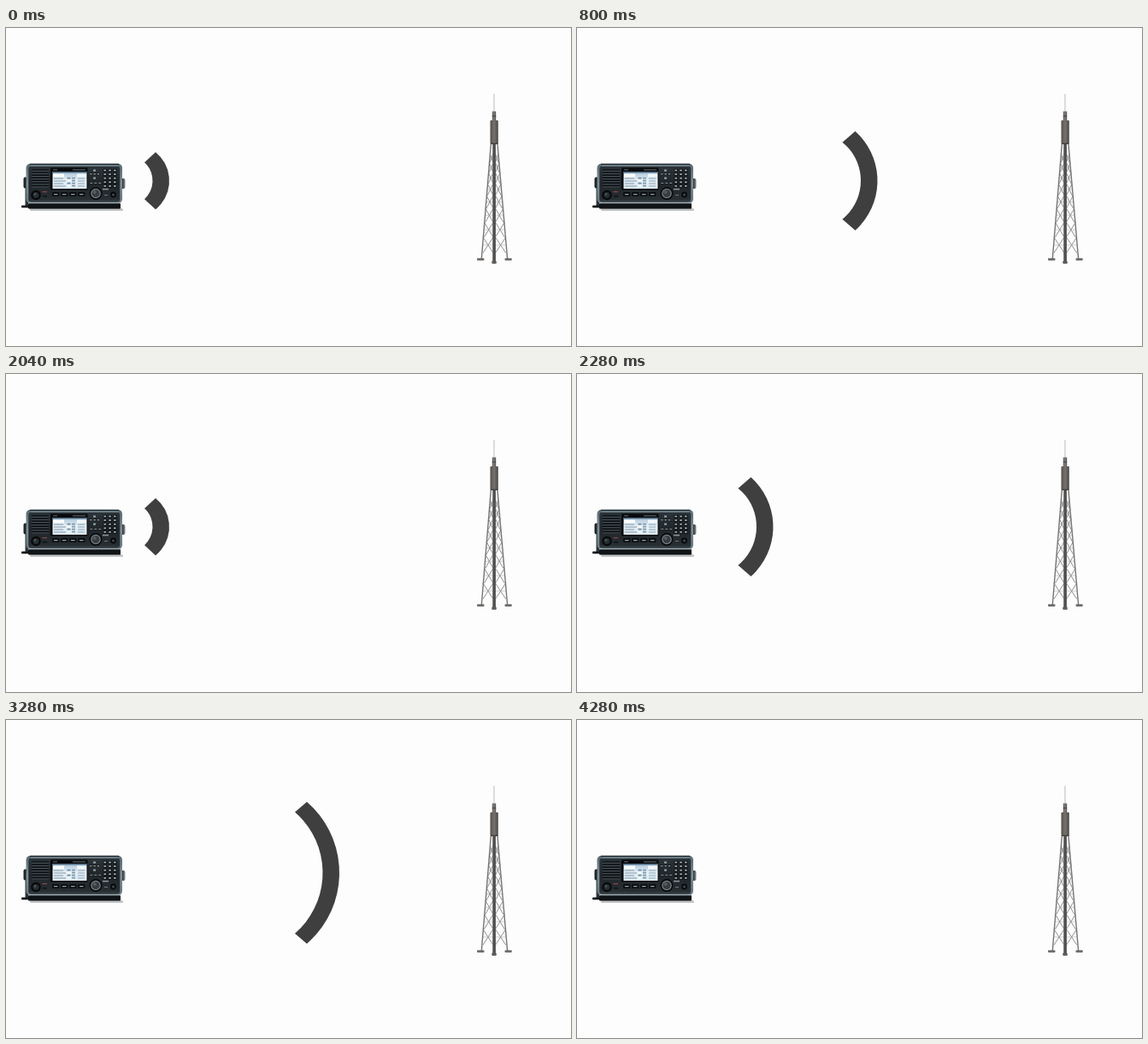
An HTML page with a canvas that plays this animation: 661 by 372 pixels, repeating every 4520 ms.

```html
<!DOCTYPE html>
<html lang="en">
<head>
<meta charset="utf-8">
<title>Radio to mast</title>
<style>
  html, body { margin: 0; width: 100%; height: 100%; overflow: hidden; background: #fdfdfd; }
  canvas { display: block; width: 661px; height: 372px; }
</style>
</head>
<body>
<canvas id="stage" width="661" height="372"></canvas>
<script>
const canvas = document.getElementById('stage');
const ctx = canvas.getContext('2d');
const LOOP = 4520;

function box(x, y, w, h, color, r = 0) {
  ctx.fillStyle = color;
  ctx.beginPath();
  ctx.roundRect(x, y, w, h, Math.min(r, w / 2, h / 2));
  ctx.fill();
}

function disc(x, y, r, color) {
  ctx.fillStyle = color;
  ctx.beginPath();
  ctx.arc(x, y, r, 0, Math.PI * 2);
  ctx.fill();
}

function line(x1, y1, x2, y2, color, width) {
  ctx.strokeStyle = color;
  ctx.lineWidth = width;
  ctx.beginPath();
  ctx.moveTo(x1, y1);
  ctx.lineTo(x2, y2);
  ctx.stroke();
}

function gradient(x1, y1, x2, y2, colors) {
  const g = ctx.createLinearGradient(x1, y1, x2, y2);
  colors.forEach((c, i) => g.addColorStop(i / (colors.length - 1), c));
  return g;
}
const vertical = (y1, y2, ...colors) => gradient(0, y1, 0, y2, colors);
const horizontal = (x1, x2, ...colors) => gradient(x1, 0, x2, 0, colors);

function drawScreen() {
  box(52, 163.5, 43.5, 26, '#07090b', 1);
  box(54.5, 168, 40, 20, vertical(168, 188, '#a9c4d8', '#e6eff5', '#dce9f1'));
  box(54.5, 168, 40, 1.6, '#4d6a84');
  box(55, 170.5, 13, 4, '#f8fbfc');
  box(83, 170.5, 11, 4, '#f1f6f9');
  for (let i = 0; i < 4; i++) {
    const y = 175.5 + i * 3;
    box(56, y, 11 + i % 2 * 3, 1, '#8097a8');
    box(71.5, y - .8, 4, 1.8, i % 2 ? '#f7fafb' : '#6f8ca2');
    box(77, y - .8, 4, 1.8, '#7f9bb0');
    box(84, y, 8, 1, '#8aa4b6');
  }
  box(55, 165.5, 5, .8, '#7d8a91');
  box(78, 165.5, 15, .9, '#77848b');
}

function drawRadio() {
  // stand, side bolts and shadow
  box(28, 211, 109, 3, 'rgba(110,114,116,.4)', 1.5);
  box(20.5, 174.5, 6, 13, '#1f2528', 2);
  box(133, 176, 6.5, 12, horizontal(133, 139.5, '#14181a', '#30373b', '#8d9498'), 2);
  box(22.5, 187, 3.5, 21, '#2b3236');
  box(18, 207.5, 18, 2.8, '#15191b', 1);
  box(26, 205, 108, 6.5, '#101416', 1);

  // body
  box(23.5, 158.8, 112.5, 46.2, vertical(159, 205, '#586973', '#7d8f99', '#66767f'), 5);
  box(26.3, 161.5, 107, 42, vertical(161, 203, '#2c353a', '#20272b', '#282f33'), 3.5);
  line(28, 159.3, 132, 159.3, '#1f282d', 1.2);
  line(29, 161.2, 131, 161.2, '#8b9ba4', .9);
  line(28, 202, 132, 202, '#3b454a', 1.2);
  line(26, 204.6, 134, 204.6, '#a5b0b5', 1.3);

  // speaker, knob and microphone socket
  for (let i = 0; i < 7; i++) {
    line(30, 166 + i * 3.1, 50, 166 + i * 3.1, '#0a0d0f', 1.4);
    line(30, 167.3 + i * 3.1, 50, 167.3 + i * 3.1, '#566269', .7);
  }
  disc(35, 195.5, 5.8, '#07090b');
  disc(35, 195.5, 3.6, '#262d31');
  disc(34, 194.5, 1.4, '#495257');
  box(42.5, 191, 5.5, 1.2, '#8f4542');
  box(43, 196, 5, 1.5, '#0d1113');

  drawScreen();

  for (let i = 0; i < 4; i++) {
    box(54 + i * 10, 192, 8.5, 5, '#0b0f11', 1);
    box(56 + i * 10, 194, 4.5, 1.2, '#98a3a9');
  }

  // tuning controls
  for (let i = 0; i < 3; i++) {
    box(98 + i * 4.3, 169.3, 3, 3, '#0c1012', .7);
    box(98.3 + i * 4.3, 170.2, 2.2, 1.2, '#b4bcc0');
    box(98 + i * 5, 180, 3.7, 2.6, '#0c1012', .7);
    box(98.3 + i * 5, 180.8, 3, 1, '#a0abb0');
  }
  box(102, 165.5, 3, 2.2, '#98a3a8', .7);
  box(102, 174.5, 3, 2.2, '#98a3a8', .7);
  disc(105, 193.5, 7.5, '#07090b');
  disc(105, 193.5, 5.8, '#7b858a');
  disc(105, 193.5, 4.6, '#353d41');
  disc(103.7, 192, 2, '#535d62');

  // keypad
  for (let row = 0; row < 5; row++) {
    for (let col = 0; col < 3; col++) {
      const x = 113.5 + col * 5.8, y = 164.8 + row * 4.6;
      box(x, y, 4.6, 3.6, '#090d0f', .7);
      box(x + .9, y + .9, 2.7, 1.6, '#b0b8bc');
    }
  }
  box(113, 187.8, 7, 1.6, '#88959a');
  disc(125.5, 195, 3.4, '#07090b');
  disc(125.5, 195, 1.6, '#3f494e');
  box(115, 195, 4, 1, '#69777e');
}

function cross(x1, y1, x2, y2, color) {
  line(x1, y1, x2, y2, color, .9);
  line(x2, y1, x1, y2, color, .9);
}

function drawMast() {
  const top = 136, foot = 270;
  const left = y => 567.3 - (y - top) / (foot - top) * 11;
  const right = y => 575 + (y - top) / (foot - top) * 11.6;

  line(571, 77, 571, 98, '#c0c0c0', 1.1);
  box(568.8, 97.5, 4.4, 11, horizontal(568.8, 573.2, '#5c5a57', '#85827f', '#4a4846'));
  line(568.8, 103, 573.2, 103, '#3f3d3b', 1);
  box(566.5, 108, 9.3, 28, horizontal(566.5, 575.8, '#56514c', '#77726d', '#4a4743'), 1);
  line(567, 135.3, 575.4, 135.3, '#3e3c3a', 1.2);

  // crossed braces on both sides; panels grow taller towards the ground
  let y = 147;
  for (let i = 0; i < 8; i++) {
    const next = y + 10.5 + i * 1.15;
    const mid = (y + next) / 2;
    cross((left(mid) + left(y)) / 2, y, 570, next, '#838383');
    cross(572.5, y, (right(mid) + right(y)) / 2, next, '#838383');
    line(left(mid), mid, right(mid), mid, '#adadad', .6);
    y = next;
  }

  line(left(top), top, left(foot), foot, '#757575', 1.4);
  line(right(top), top, right(foot), foot, '#757575', 1.4);
  box(569.2, top, 3.8, 138, horizontal(569, 573, '#6d6b6a', '#4a4948', '#666462'));
  box(551, 269.3, 8.5, 2.8, '#716d69', 1);
  box(583.5, 269.3, 8.3, 2.8, '#716d69', 1);
  box(568.3, 272.5, 5.5, 3.2, '#5f5b58', 1);
}

// outer edge: half height and bow; inner edge: the same
const SIZES = [
  { h: 33.5, bow: 16, innerH: 21.5, innerBow: 9.5 },
  { h: 58, bow: 26, innerH: 45, innerBow: 21.5 },
  { h: 83, bow: 38, innerH: 71, innerBow: 32.5 }
];
const BAND = 19.5;
const GROUPS = [[191, 178.7], [313, 178.7], [434, 174.8]];

function edge(x, y, h, bow, back) {
  const r = (h * h + bow * bow) / (2 * bow);
  const a = Math.asin(h / r);
  ctx.arc(x - r, y, r, back ? a : -a, back ? -a : a, back);
}

function drawWave(step) {
  const [x0, y] = GROUPS[Math.floor(step / 3)];
  const size = step % 3;
  const x = x0 + size * 38.5;
  const s = SIZES[size];
  ctx.fillStyle = '#3f3f3f';
  ctx.beginPath();
  edge(x, y, s.h, s.bow, false);
  edge(x - BAND, y, s.innerH, s.innerBow, true);
  ctx.closePath();
  ctx.fill();
}

// four beats per second, on a 40 ms grid
const BEATS = [40, 280, 520, 760];
const WAVES = 18;
function stepAt(t) {
  let n = 0;
  for (let i = 0; i < WAVES; i++) {
    const late = i % 8 === 7 ? 40 : 0;
    if (t >= BEATS[i % 4] + Math.floor(i / 4) * 1000 + late) n = i + 1;
  }
  return n;
}

let shown = -1;
function frame() {
  const step = stepAt(performance.now() % LOOP);
  if (step !== shown) {
    shown = step;
    box(0, 0, 661, 372, '#fdfdfd');
    drawRadio();
    drawMast();
    if (step < WAVES) drawWave(step % 9);
  }
  requestAnimationFrame(frame);
}
frame();
</script>
</body>
</html>
```
